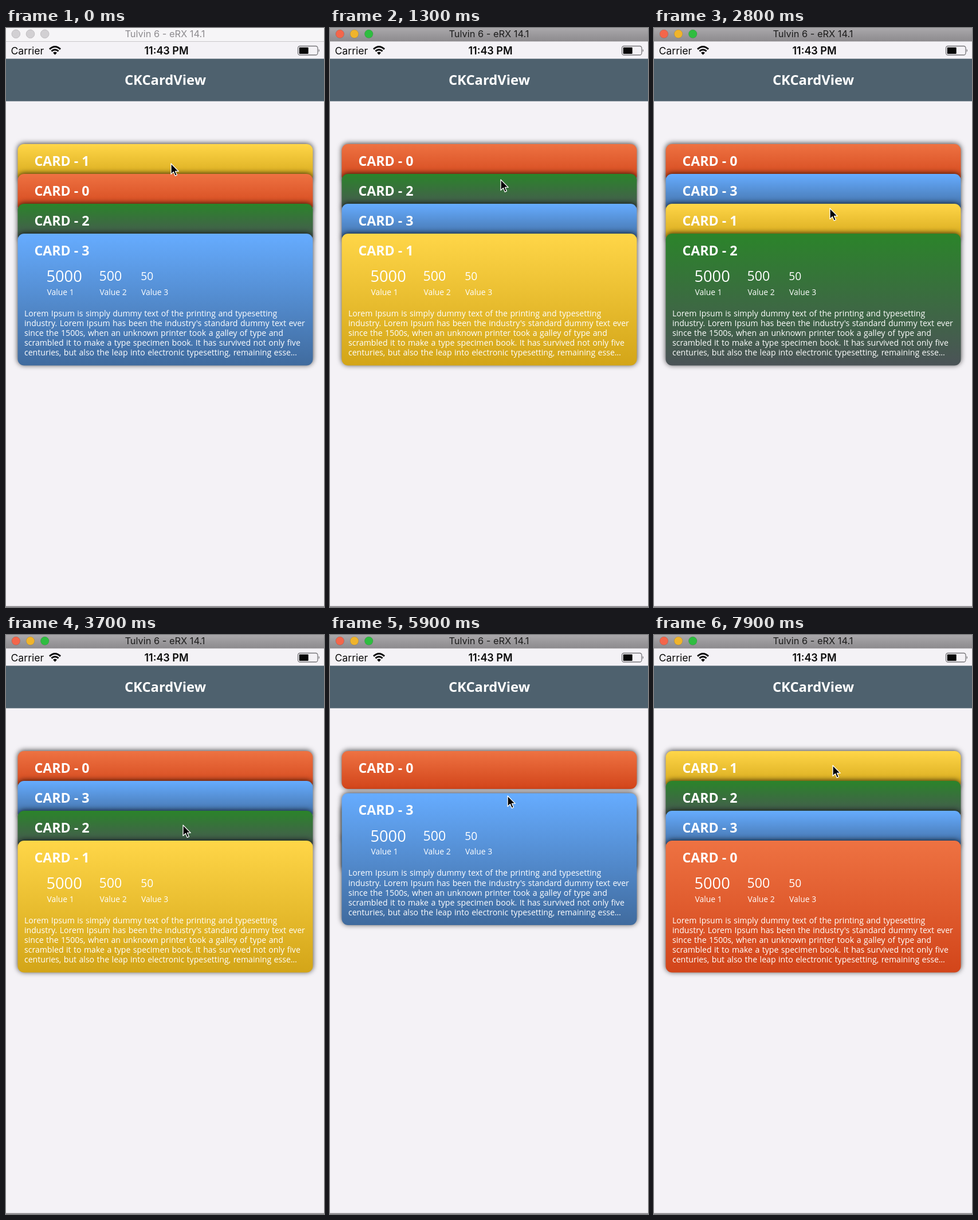
An HTML page for the animation above (8 s loop, 555 by 1008 pixels).

```html
<!DOCTYPE html>
<html lang="en">
<head>
<meta charset="utf-8">
<title>CKCardView</title>
<style>
  html, body { margin: 0; width: 100%; height: 100%; overflow: hidden; background: #f4f2f6; }
  svg { display: block; width: 100vw; height: 100vh; }
  .ui { font-family: Inter, Roboto, sans-serif; }
  .app { font-family: "Open Sans", "Noto Sans", sans-serif; font-weight: 500; fill: #fff; }
  .bold { font-weight: 600; }
  .heavy { font-weight: 700; }
  .lorem { word-spacing: .8px; }
</style>
</head>
<body>
<svg id="stage" viewBox="0 0 555 1008" preserveAspectRatio="none">
  <defs>
    <linearGradient id="bar" x2="0" y2="1">
      <stop stop-color="#aaa8ab"/><stop offset="1" stop-color="#8c8a8d"/>
    </linearGradient>
    <filter id="shadow" x="-5%" y="-40%" width="110%" height="180%" color-interpolation-filters="sRGB">
      <feDropShadow dx="0" dy="-1" stdDeviation="5" flood-opacity=".75"/>
    </filter>
  </defs>
  <rect width="555" height="1008" fill="#f4f2f6"/>
  <rect id="titleBar" width="555" height="23.5"/>
  <path d="M0 23.5H555" stroke="#c9c7ca"/>
  <g id="lights" stroke-width="1"></g>
  <text id="windowTitle" class="ui" x="277.5" y="16.3" font-size="16.4" text-anchor="middle">Tulvin 6 - eRX 14.1</text>

  <g class="ui" fill="#080808">
    <text x="8.5" y="45.5" font-size="17.6">Carrier</text>
    <text class="bold" x="280" y="45.5" font-size="18" text-anchor="middle">11:43 PM</text>
    <g fill="none" stroke="#080808" stroke-width="3">
      <path d="M76 36.8Q85.5 28.2 95 36.8M79.4 40.4Q85.5 35 91.6 40.4"/>
    </g>
    <path d="M82 43Q85.5 40 89 43L85.5 46.8Z"/>
    <rect x="509.5" y="31.5" width="34.5" height="15.5" rx="3.5" fill="none" stroke="#77767a" stroke-width="1.3"/>
    <rect x="511.7" y="33.7" width="16" height="11.2" rx="1"/>
    <path d="M545.6 36.5Q548.6 39.2 545.6 42Z" fill="#77767a"/>
  </g>

  <rect y="53.5" width="555" height="74" fill="#4e616e"/>
  <text class="app heavy" x="278" y="99" font-size="23.8" text-anchor="middle">CKCardView</text>
  <g id="deck"></g>
  <path id="cursor" d="M0 0V18.6L4.4 14.5L7.3 21.4L10.4 20L7.5 13.4H13.2Z" fill="#000" stroke="#fff" stroke-width="1.3" stroke-linejoin="round"/>
  <path d="M0 1007.2H555" stroke="#858388" stroke-width="1.5"/>
</svg>
<script>
const LOOP = 8000, STEP = 100, SLIDE = 500;
const TOP = 202, GAP = 52, OPEN = 229.5, CLOSED = 66, ACTIVATE = 400;
const colors = [['#ee7242', '#d2451a'], ['#ffd648', '#d3a518'], ['#2b842a', '#4b5357'], ['#66acff', '#406b9e']];
const lorem = [
  'Lorem Ipsum is simply dummy text of the printing and typesetting',
  "industry. Lorem Ipsum has been the industry's standard dummy text ever",
  'since the 1500s, when an unknown printer took a galley of type and',
  'scrambled it to make a type specimen book. It has survived not only five',
  'centuries, but also the leap into electronic typesetting, remaining esse…'
];
// [time, tapped card]
const taps = [[500, 1], [1700, 2], [3050, 1], [4650, 2], [5750, 3], [7150, 0]];
// [time, x, y]
const trail = [
  [0, 288, 236], [700, 288, 236], [1300, 298, 264], [1800, 298, 264], [2400, 307, 314],
  [3200, 307, 314], [3600, 309, 331], [4300, 309, 331], [4600, 307, 314], [5200, 307, 314],
  [5650, 310, 280], [6000, 310, 280], [6500, 314, 228], [7000, 314, 228], [7500, 312, 227], [8000, 312, 227]
];
const lightColors = ['#f4664b', '#f0b42c', '#2fbd40'];

const $ = id => document.getElementById(id);
const deck = $('deck');
const ease = u => (1 - Math.cos(Math.PI * Math.min(1, Math.max(0, u)))) / 2;
const mix = (a, b, u) => a + (b - a) * u;

function add(parent, tag, attrs, text = '') {
  const el = document.createElementNS('http://www.w3.org/2000/svg', tag);
  for (const key in attrs) el.setAttribute(key, attrs[key]);
  el.textContent = text;
  parent.append(el);
  return el;
}

function makeCard([from, to], i) {
  const root = add(deck, 'g', { class: 'app' });
  const grad = add(root, 'linearGradient', { id: 'shade' + i, x2: 0, y2: 1 });
  add(grad, 'stop', { 'stop-color': from });
  add(grad, 'stop', { offset: 1, 'stop-color': to });
  const face = add(root, 'rect', { x: 20.5, width: 515, rx: 11, fill: `url(#shade${i})`, filter: 'url(#shadow)' });
  const write = (parent, x, y, size, text, style = '') =>
    add(parent, 'text', { x, y, 'font-size': size, class: style }, text);
  write(root, 49.5, 37.5, 23.2, 'CARD - ' + i, 'heavy');
  const body = add(root, 'g', {});
  write(body, 70.5, 84.3, 27.2, '5000');
  write(body, 162.6, 82.3, 23.2, '500');
  write(body, 235.2, 81.3, 19.2, '50');
  [71.5, 163.5, 236].forEach((x, n) => write(body, x, 107, 13.9, 'Value ' + (n + 1)));
  lorem.forEach((line, n) => write(body, 32, 144 + n * 17.1, 14.1, line, 'lorem'));
  return { root, face, body };
}

const cards = colors.map(makeCard);
const lights = lightColors.map((c, i) => add($('lights'), 'circle', { cx: 17.3 + i * 25.2, cy: 10.3, r: 7.3 }));

function drawCards(t) {
  let order = [1, 0, 2, 3], before = order, start = -SLIDE;
  for (const [time, card] of taps) {
    if (t < time) break;
    before = order;
    order = order.filter(c => c !== card).concat(card);
    start = time;
  }
  const u = ease((t - start) / SLIDE);
  order.forEach((c, slot) => {
    const { root, face, body } = cards[c], front = slot === 3;
    const y = TOP + GAP * mix(before.indexOf(c), slot, u);
    root.setAttribute('transform', `translate(0 ${y})`);
    face.setAttribute('height', front ? OPEN : CLOSED);
    body.setAttribute('display', front ? 'inline' : 'none');
    if (deck.children[slot] !== root) deck.insertBefore(root, deck.children[slot]);
  });
}

function drawWindow(active) {
  $('titleBar').setAttribute('fill', active ? 'url(#bar)' : '#f6f5f7');
  $('windowTitle').setAttribute('fill', active ? '#1c1c1c' : '#8d8b8f');
  lights.forEach((light, i) => {
    light.setAttribute('fill', active ? lightColors[i] : '#d2d0d3');
    light.setAttribute('stroke', active ? 'rgba(0,0,0,.12)' : '#c0bec1');
  });
}

function drawCursor(t) {
  const n = trail.findIndex(p => p[0] > t);
  const [t0, x0, y0] = trail[n - 1], [t1, x1, y1] = trail[n];
  const u = ease((t - t0) / (t1 - t0));
  $('cursor').setAttribute('transform', `translate(${mix(x0, x1, u)} ${mix(y0, y1, u)})`);
}

function render(ms) {
  const t = Math.floor((ms % LOOP) / STEP) * STEP;
  drawWindow(t >= ACTIVATE);
  drawCards(t);
  drawCursor(t);
}

const origin = performance.now();
function tick() {
  render(performance.now() - origin);
  requestAnimationFrame(tick);
}
tick();
</script>
</body>
</html>
```
